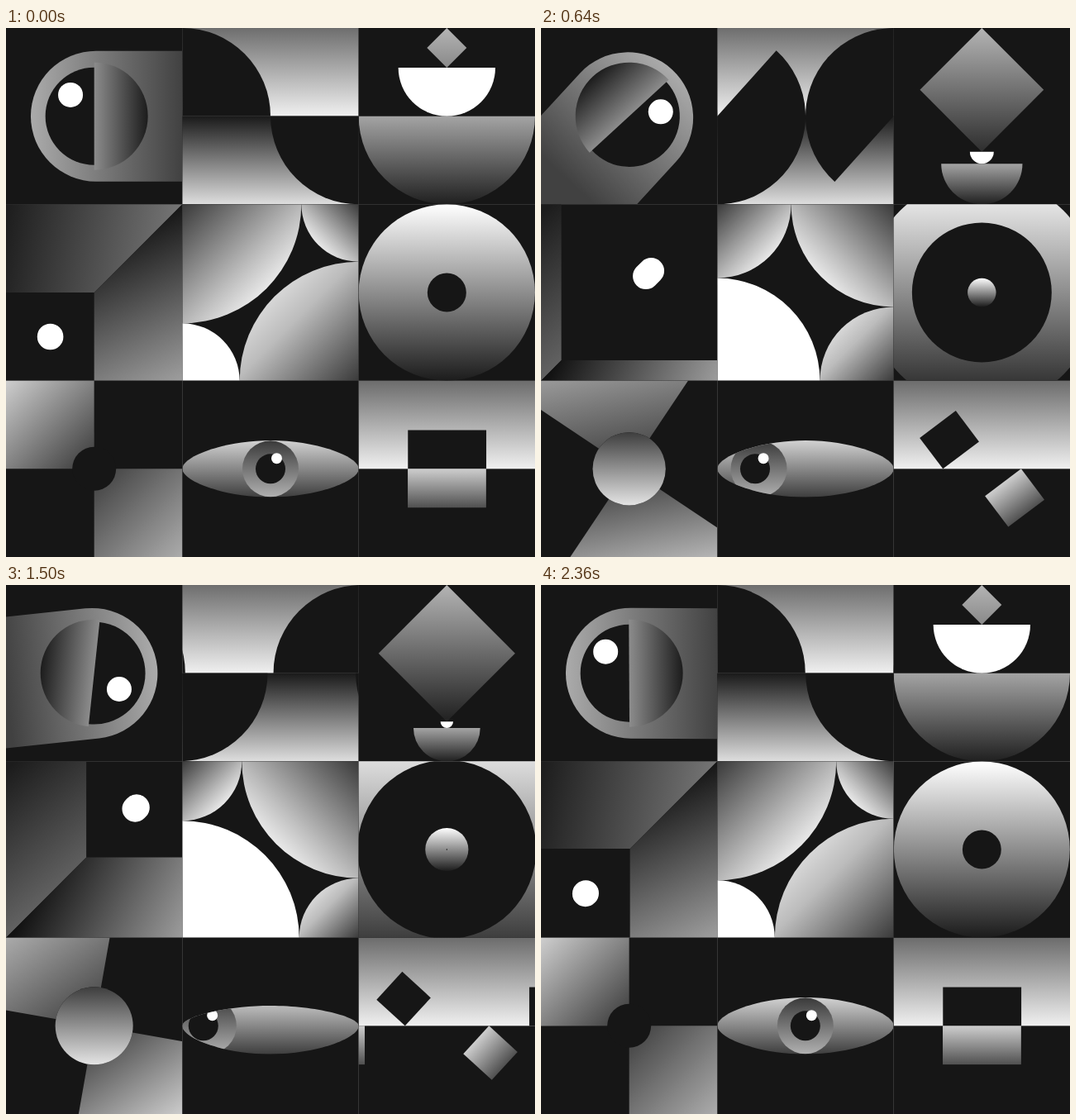
These frames come from a looping animation (640x640 px, 2430 ms). An HTML page:

```html
<!DOCTYPE html>
<html lang="en">
<head>
<meta charset="utf-8">
<title>Geometric tiles</title>
<style>
html, body { margin: 0; width: 100%; height: 100%; overflow: hidden; background: #aaa; }
svg { display: block; }
body > svg { width: 100vw; height: 100vh; }
</style>
</head>
<body>
<script>
const NS = 'http://www.w3.org/2000/svg';
const LOOP = 2430, FRAMES = 34, HALF = 17;
const S = 640 / 3, C = S / 2, INK = '#161616';

function el(parent, tag, attrs = {}) {
  const node = document.createElementNS(NS, tag);
  set(node, attrs);
  parent.appendChild(node);
  return node;
}
function set(node, attrs) {
  for (const key in attrs) node.setAttribute(key, attrs[key]);
}

const root = el(document.body, 'svg', { viewBox: '0 0 640 640' });
const defs = el(root, 'defs');
let gradCount = 0;

// Linear gradient; coordinates are box fractions unless user is set.
function grad(colors, [x1, y1, x2, y2] = [0, 0, 0, 1], user = false, stops = [0, 1]) {
  const id = 'g' + gradCount++;
  const g = el(defs, 'linearGradient', {
    id, x1, y1, x2, y2,
    gradientUnits: user ? 'userSpaceOnUse' : 'objectBoundingBox'
  });
  colors.forEach((c, i) => el(g, 'stop', { offset: stops[i], 'stop-color': c }));
  return `url(#${id})`;
}

function cell(col, row) {
  const tile = el(root, 'svg', { x: col * S, y: row * S, width: S, height: S, overflow: 'hidden' });
  el(tile, 'rect', { x: -1, y: -1, width: S + 2, height: S + 2, fill: INK });
  return tile;
}

const mix = (a, b, p) => a + (b - a) * p;
const clamp = x => Math.min(1, Math.max(0, x));
const smooth = x => { x = clamp(x); return x * x * (3 - 2 * x); };
const circle = (parent, cx, cy, r, fill) => el(parent, 'circle', { cx, cy, r, fill });
const path = (parent, d, fill) => el(parent, 'path', { d, fill });
const bowl = r => `M${-r} 0A${r} ${r} 0 0 0 ${r} 0Z`;
const dome = r => `M${-r} 0A${r} ${r} 0 0 1 ${r} 0Z`;

// cubic-bezier(.85, 0, .05, 1)
function ease(x) {
  if (x <= 0) return 0;
  if (x >= 1) return 1;
  let lo = 0, hi = 1, s = 0.5;
  for (let i = 0; i < 30; i++) {
    s = (lo + hi) / 2;
    const r = 1 - s;
    if (3 * r * r * s * 0.85 + 3 * r * s * s * 0.05 + s * s * s < x) lo = s; else hi = s;
  }
  return s * s * (3 - 2 * s);
}
const out = (n, delay) => n < HALF ? ease((n - delay) / HALF) : 1;
const back = (n, delay) => n < HALF ? 0 : ease((n - HALF - delay) / HALF);
const swing = (n, d1, d2) => n < HALF ? out(n, d1) : 1 - back(n, d2);

function makeArch() {
  const tile = cell(0, 0), r = 79, x = 2.3;
  const arch = path(tile, `M300 ${-r}H${x}A${r} ${r} 0 0 0 ${x} ${r}H300Z`,
    grad(['#ababab', '#414141'], [-77, 0, 107, 0], true));
  const inner = el(tile, 'g');
  const disc = circle(inner, 0, 0, 59, INK);
  path(inner, 'M0 -65A65 65 0 0 1 0 65Z', grad(['#8c8c8c', '#1c1c1c'], [0, 0, 1, 0]));
  const dot = circle(tile, 0, 0, 15, '#fff');
  return n => {
    const p = swing(n, 0.4, 0.17);
    set(arch, { transform: `translate(${C} ${C}) rotate(${180 * p})` });
    set(inner, { transform: `translate(${C} ${C}) rotate(${-180 * p})` });
    set(disc, { r: 59 + 3 * p });
    const a = (-138 + 176.5 * p) * Math.PI / 180;
    const d = 38.5 - 3 * p + 3 * Math.sin(Math.PI * p);
    set(dot, { cx: C + d * Math.cos(a), cy: C + d * Math.sin(a) });
  };
}

function makeWaves() {
  const tile = cell(1, 0);
  el(tile, 'rect', { width: S, height: C, fill: grad(['#6e6e6e', '#f0f0f0']) });
  el(tile, 'rect', { y: C, width: S, height: C, fill: grad(['#1a1a1a', '#dedede']) });
  const [left, right, nextLeft, nextRight] =
    [dome(C), bowl(C), dome(C), bowl(C)].map(d => path(tile, d, INK));
  return n => {
    const turn = 180 * out(n, 0.42), q = back(n, 0.2);
    const place = (node, x, a) => set(node, { transform: `translate(${x} ${C}) rotate(${a})` });
    place(left, -C * q, turn);
    place(right, S + C * q, turn);
    place(nextLeft, -C * (1 - q), 0);
    place(nextRight, S + C * (1 - q), 0);
  };
}

function makeStack() {
  const tile = cell(2, 0);
  const gem = path(tile, '', grad(['#b4b4b4', '#1a1a1a'], [0, 0, 0, 172], true));
  const cup = path(tile, '', '#fff');
  const base = path(tile, '', grad(['#a4a4a4', '#202020']));
  return n => {
    const p = swing(n, -0.27, -0.66);
    const h = mix(48, 172.2, p), r = mix(58.67, 4.7, p), big = S - h - r;
    set(gem, { d: `M${C} 0l${h / 2} ${h / 2}l${-h / 2} ${h / 2}l${-h / 2} ${-h / 2}Z` });
    set(cup, { d: bowl(r), transform: `translate(${C} ${h})` });
    set(base, { d: bowl(big), transform: `translate(${C} ${h + r})` });
  };
}

function makeRoom() {
  const tile = cell(0, 1);
  const top = path(tile, '', grad(['#1e1e1e', '#7a7a7a'], [0, 20, S, 60], true));
  const right = path(tile, '', grad(['#181818', '#9e9e9e'], [130, 45, S, S], true));
  const left = path(tile, '', grad(['#1c1c1c', '#707070'], [0, 10, 120, 150], true));
  const floor = path(tile, '', grad(['#121212', '#9c9c9c'], [50, 130, S, S], true));
  const dot = el(tile, 'line', { stroke: '#fff', 'stroke-width': 31.6, 'stroke-linecap': 'round' });
  return n => {
    const p = swing(n, 0.25, 0.45);
    const a = Math.max(0, C * (1 - 3.2 * p)), b = Math.max(0, C * (1 - 3.2 * (1 - p)));
    set(top, { d: `M0 0H${S}L${S - a} ${a}H0Z` });
    set(right, { d: `M${S} 0V${S}H${S - a}V${a}Z` });
    set(left, { d: `M0 0H${b}V${S - b}L0 ${S}Z` });
    set(floor, { d: `M0 ${S}L${b} ${S - b}H${S}V${S}Z` });
    const m = swing(n, 0.5, 0.5);
    const h = 0.035 * Math.pow(Math.max(0, Math.sin(Math.PI * m)), 0.6) + 0.0001;
    const x = v => 53.6 + 106.4 * v, y = v => 160.2 - 106.4 * v;
    set(dot, { x1: x(m - h), y1: y(m - h), x2: x(m + h), y2: y(m + h) });
  };
}

function makePetals() {
  const tile = cell(1, 1);
  const shade = (x, y, light) =>
    grad(['#3a3a3a', '#bcbcbc', light], [x, y, 1 - x, 1 - y], false, [0, 0.52, 0.74]);
  // Quarter discs; sx and sy point from the corner into the tile.
  const petal = (x, y, sx, sy, fill) => {
    const node = path(tile, '', fill);
    return r => set(node, {
      d: `M${x} ${y}h${sx * r}A${r} ${r} 0 0 ${sx === sy ? 1 : 0} ${x} ${y + sy * r}Z`
    });
  };
  const tl = petal(0, 0, 1, 1, shade(0, 0, '#f0f0f0'));
  const tr = petal(S, 0, -1, 1, shade(1, 0, '#f0f0f0'));
  const br = petal(S, S, -1, -1, shade(1, 1, '#dcdcdc'));
  const bl = petal(0, S, 1, -1, '#fff');
  return n => {
    const r = mix(144, 69.3, swing(n, 0.42, 0.07));
    tl(r); br(r);
    tr(S - r); bl(S - r);
  };
}

function makeRings() {
  const tile = cell(2, 1), fill = grad(['#fff', '#1c1c1c']);
  const levels = [0, 23.5, C, 152];
  const rings = [fill, INK, fill, INK].map(f => circle(tile, C, C, 0, f));
  return n => {
    const stage = out(n, 0.42) + back(n, 0.3);
    rings.forEach((ring, i) => {
      const v = Math.min(3, Math.max(0, 2 - i + stage)), k = Math.min(2, Math.floor(v));
      set(ring, { r: mix(levels[k], levels[k + 1], v - k) });
    });
  };
}

function makeFan() {
  const tile = cell(0, 2);
  const fan = el(tile, 'g');
  path(fan, 'M0 0H-300V-300H0Z', grad(['#363636', '#cecece'], [0, 0, -C, -C], true));
  path(fan, 'M0 0H300V300H0Z', grad(['#3c3c3c', '#acacac'], [0, 0, C, C], true));
  const dark = circle(tile, C, C, 0, INK);
  const ball = circle(tile, C, C, 0, grad(['#3e3e3e', '#e4e4e4']));
  return n => {
    const p = swing(n, -0.2, -0.65), r = mix(26.5, 48.2, p);
    set(fan, { transform: `translate(${C} ${C}) rotate(${-180 * p})` });
    set(dark, { r });
    set(ball, { r, opacity: clamp((p - 0.4) / 0.2) });
  };
}

function makeEye() {
  const tile = cell(1, 2);
  const clip = el(defs, 'clipPath', { id: 'lens' });
  const shape = path(clip, '', '#fff');
  const eye = el(tile, 'g', { 'clip-path': 'url(#lens)' });
  el(eye, 'rect', { y: C - 34.4, width: S, height: 68.8, fill: grad(['#d2d2d2', '#3e3e3e']) });
  const iris = circle(eye, C, C, 34, grad(['#3a3a3a', '#b0b0b0']));
  const pupil = circle(eye, C, C, 18, INK);
  const glint = circle(eye, C, C - 12.7, 6.5, '#fff');
  const lid = h => `C0 ${C + h * 0.45} 52 ${C + h} ${C} ${C + h}S${S} ${C + h * 0.45} ${S} ${C}`;
  const lower = `C${S} ${C + 15.4} ${S - 52} ${C + 34.3} ${C} ${C + 34.3}S0 ${C + 15.4} 0 ${C}Z`;
  return n => {
    const p = swing(n, 0.46, 0.2), k = n - HALF;
    const shut = smooth((k - 2.9) / 4.6) * (1 - smooth((k - 8.8) / 4.6));
    set(shape, { d: `M0 ${C}${lid(mix(-34.3, 34.3, shut))}${lower}` });
    set(eye, { visibility: shut > 0.995 ? 'hidden' : 'visible' });
    set(iris, { cx: C - 77.7 * p });
    set(pupil, { cx: C - 84 * p });
    set(glint, { cx: C + 7.5 - 80.5 * p });
  };
}

function makeBlocks() {
  const tile = cell(2, 2), h = 46.8, wide = 94.8;
  el(tile, 'rect', { width: S, height: C, fill: grad(['#6c6c6c', '#f0f0f0']) });
  const gray = grad(['#cecece', '#505050']);
  const block = (y, fill) => el(tile, 'rect', { y, width: wide, height: h, fill });
  const hole = block(-h, INK), nextHole = block(-h, INK);
  const slab = block(0, gray), nextSlab = block(0, gray);
  return n => {
    const u = out(n, -0.3), q = back(n, -0.65);
    const w = mix(wide, 46, u), turn = -45 * (u + q);
    const x1 = 59.6 - 62.5 * q, x2 = 154.2 + 62.5 * q, gap = 155.5 * (1 - q);
    const at = (x, a) => `translate(${x} ${C}) rotate(${a})`;
    set(hole, { width: w, transform: at(x1, turn) });
    set(slab, { x: -w, width: w, transform: at(x2, turn) });
    set(nextHole, { transform: at(59.6 + gap, 0) });
    set(nextSlab, { x: -wide, transform: at(154.2 - gap, 0) });
  };
}

const tiles = [makeArch, makeWaves, makeStack, makeRoom, makePetals,
  makeRings, makeFan, makeEye, makeBlocks].map(make => make());

function draw(ms) {
  const n = Math.floor((ms % LOOP + 5) / (LOOP / FRAMES)) % FRAMES;
  tiles.forEach(update => update(n));
}

const start = performance.now();
function tick() {
  draw(performance.now() - start);
  requestAnimationFrame(tick);
}
tick();
</script>
</body>
</html>
```
